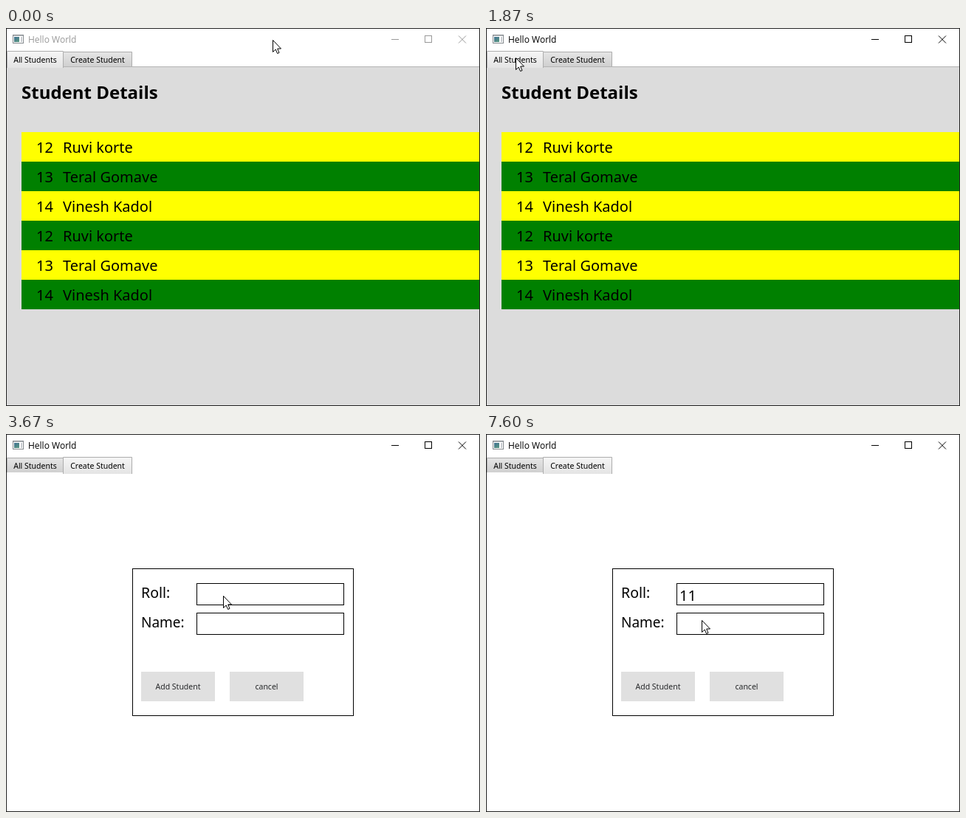
Write an HTML page with a canvas that moves like this. It is 642x512 px and loops after 8000 ms.

```html
<!DOCTYPE html>
<html lang="en">
<head>
<meta charset="utf-8">
<title>Hello World</title>
<style>
  html, body { margin: 0; width: 100%; height: 100%; overflow: hidden; background: #fff; }
  canvas { display: block; }
</style>
</head>
<body>
<canvas id="stage" width="642" height="512"></canvas>
<script>
const ctx = document.getElementById('stage').getContext('2d');
const LOOP = 8000;
const UI = '10.5px "Noto Sans", sans-serif';
const BODY = '20px "Noto Sans", sans-serif';
const students = [[12, 'Ruvi korte'], [13, 'Teral Gomave'], [14, 'Vinesh Kadol']];
const arrow = new Path2D('M.5.5V16.5L4.2 13 6.6 18.5 9 17.5 6.7 12H11.5Z');

// Pointer stops: time, x, y
const pointer = [
  [0, 361, 16], [870, 137, 109], [930, 137, 109], [1200, 112, 39], [1270, 112, 39],
  [1530, 43, 50], [1670, 43, 50], [1730, 40, 40], [1870, 40, 40], [2200, 80, 76],
  [2530, 80, 76], [2800, 118, 40], [3000, 118, 40], [3530, 288, 222], [3600, 288, 222],
  [3800, 311, 212], [5470, 311, 212], [5730, 331, 226], [6000, 292, 252], [LOOP, 292, 252]
];

const within = (t, from, to) => t >= from && t < to;

function rect(x, y, w, h, fill) {
  ctx.fillStyle = fill;
  ctx.fillRect(x, y, w, h);
}

function outline(x, y, w, h, color) {
  ctx.strokeStyle = color;
  ctx.strokeRect(x + .5, y + .5, w - 1, h - 1);
}

function text(value, x, y, font, color = '#000', align = 'left') {
  ctx.font = font;
  ctx.fillStyle = color;
  ctx.textAlign = align;
  ctx.fillText(value, x, y);
}

function line(path, color) {
  ctx.strokeStyle = color;
  ctx.stroke(new Path2D(path));
}

function titleBar(active) {
  const color = active ? '#000' : '#999';
  rect(9, 9, 15, 12, '#fff');
  rect(9, 9, 15, 2, '#b8bcc0');
  const pane = ctx.createLinearGradient(11, 11, 17, 20);
  pane.addColorStop(0, '#3f6f96');
  pane.addColorStop(1, '#5d9a80');
  rect(11, 12, 7, 7, pane);
  rect(20, 12, 2, 7, '#c8ccd0');
  outline(9, 9, 15, 12, '#858a8e');
  text('Hello World', 30, 20, '12px "Open Sans", sans-serif', color);
  line('M522 15.5h10', color);
  outline(567, 10, 10, 10, color);
  line('M613 10.5l10 10m0-10l-10 10', color);
}

function tab(label, x, w, selected) {
  const top = selected ? 31 : 32, bottom = selected ? 54 : 52;
  const shade = ctx.createLinearGradient(0, top, 0, bottom);
  shade.addColorStop(0, selected ? '#f6f6f6' : '#e6e6e6');
  shade.addColorStop(1, selected ? '#e4e4e4' : '#d0d0d0');
  rect(x, top, w, bottom - top, shade);
  line(`M${x + .5} ${bottom}V${top + .5}H${x + w - .5}V${bottom}`, '#adadad');
  text(label, x + w / 2, 47, UI, '#000', 'center');
}

function studentList() {
  rect(1, 52, 640, 459, '#dcdcdc');
  rect(1, 52, 640, 1, '#b4b4b4');
  text('Student Details', 21, 96, 'bold 24px "Noto Sans", sans-serif');
  for (let i = 0; i < 6; i++) {
    const y = 141 + i * 40, [roll, name] = students[i % 3];
    rect(21, y, 620, 40, i % 2 ? '#008000' : '#ffff00');
    text(roll, 41, y + 28, BODY);
    text(name, 77, y + 28, BODY);
  }
}

function button(label, x) {
  rect(x, 322, 100, 40, '#e0e0e0');
  text(label, x + 50, 346, UI, '#26282a', 'center');
}

function caret(x, y) {
  rect(x, y, 1, 24, '#000');
}

function studentForm(t) {
  outline(171, 182, 300, 200, '#000');
  text('Roll:', 183, 222, '19.5px "Noto Sans", sans-serif');
  text('Name:', 183, 262, '19px "Noto Sans", sans-serif');
  outline(258, 202, 200, 30, '#000');
  outline(258, 242, 200, 30, '#000');
  button('Add Student', 183);
  button('cancel', 303);

  const typed = t >= 4800 ? '11' : t >= 4600 ? '1' : '';
  text(typed, 262, 226, BODY);
  if (within(t, 3730, 4270) || within(t, 4600, 4870)) caret(262 + 11 * typed.length, 206);
  if (within(t, 6070, 6530) || within(t, 7000, 7600)) caret(262, 246);
}

function drawPointer(t) {
  const next = Math.max(1, pointer.findIndex(p => p[0] > t));
  const [t0, x0, y0] = pointer[next - 1], [t1, x1, y1] = pointer[next];
  const k = (t - t0) / (t1 - t0), ease = k * k * (3 - 2 * k);
  ctx.save();
  ctx.translate(Math.round(x0 + (x1 - x0) * ease), Math.round(y0 + (y1 - y0) * ease));
  ctx.fillStyle = '#fff';
  ctx.fill(arrow);
  ctx.strokeStyle = '#000';
  ctx.stroke(arrow);
  ctx.restore();
}

function draw(now) {
  // The screen updates 15 times a second, in times rounded to 10 ms.
  const tick = Math.floor((now % LOOP) * .015 + .1);
  const t = Math.min(LOOP - 10, Math.round(tick * 100 / 15) * 10);
  const form = within(t, 1270, 1870) || t >= 2800;
  rect(0, 0, 642, 512, '#fff');
  titleBar(t >= 930);
  if (form) studentForm(t); else studentList();
  tab('All Students', 1, 77, !form);
  tab('Create Student', 77, 94, form);
  outline(0, 0, 642, 512, '#222');
  drawPointer(t);
  requestAnimationFrame(draw);
}
requestAnimationFrame(draw);
</script>
</body>
</html>
```
